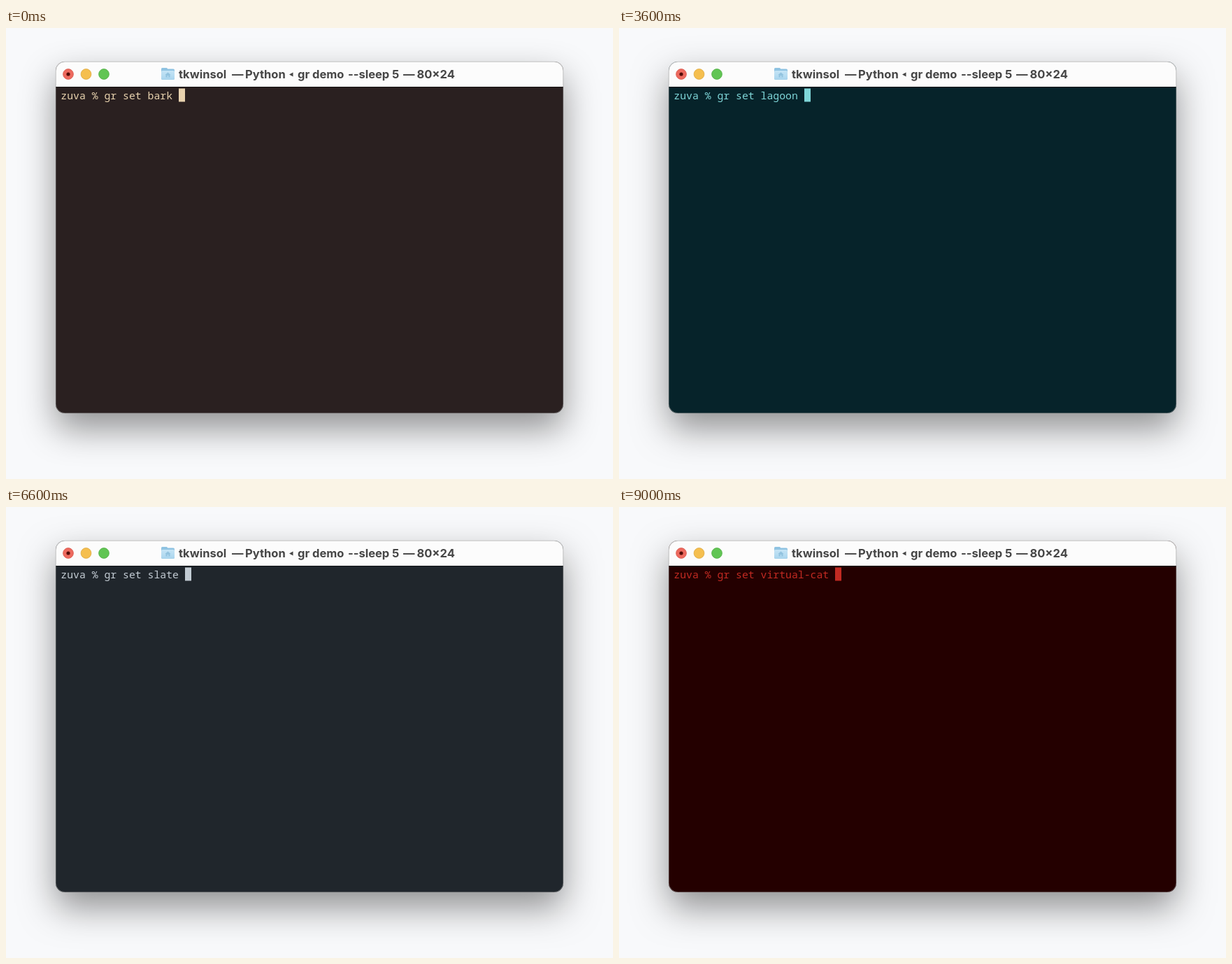
Write an HTML page with a canvas that moves like this. It is 868 by 645 pixels and loops after 9.6 s.

```html
<!DOCTYPE html>
<html lang="en">
<head>
<meta charset="utf-8">
<title>Terminal themes</title>
<style>
  html, body { margin: 0; width: 100%; height: 100%; overflow: hidden; background: #f8f9fb; }
  canvas, svg { position: absolute; left: 0; top: 0; display: block; }
  .title { font: 700 16.5px Inter, "Liberation Sans", sans-serif; fill: #464646; }
  .prompt { font: 500 14.8px "Noto Sans Mono", "DejaVu Sans Mono", monospace; white-space: pre; }
</style>
</head>
<body>
<canvas id="stage" width="868" height="645"></canvas>
<svg width="868" height="645" viewBox="0 0 868 645">
  <g class="title">
    <text x="247" y="71.5">tkwinsol</text>
    <text x="323" y="71.5">—</text>
    <text x="342" y="71.5">Python</text>
    <text x="417" y="71.5">gr demo</text>
    <text x="489" y="71.5">--sleep 5</text>
    <text x="568" y="71.5">—</text>
    <text x="587.5" y="71.5">80×24</text>
  </g>
  <text id="prompt" class="prompt" x="78.3" y="102"></text>
</svg>
<script>
const STEP = 600;
const CELL = 8.88;
const WIN = { x: 71, y: 48, w: 726, h: 503, r: 13, bar: 36 };

// name, background, foreground
const themes = [
  ["bark", "#2a2020", "#e8d2ae"],
  ["blossom", "#2b1420", "#f2b6cc"],
  ["cobalt", "#0b1c3c", "#9cc4f2"],
  ["default", "#000000", "#ffffff"],
  ["fern", "#0a1d12", "#8fd69a"],
  ["grape", "#02030f", "#c832fa"],
  ["lagoon", "#06232a", "#7fd6d8"],
  ["moss", "#0c0d02", "#b4c560"],
  ["nicotine", "#0c0d02", "#ecbe63"],
  ["port", "#183787", "#f59451"],
  ["rust", "#2a1208", "#e88a4e"],
  ["slate", "#20262c", "#c3ccd4"],
  ["swamp-matcha", "#1c3413", "#d3e2ae"],
  ["tide", "#0a2030", "#86c6e6"],
  ["umber", "#24180c", "#dcb482"],
  ["virtual-cat", "#240000", "#c22a22"]
];

const ctx = document.getElementById("stage").getContext("2d");
const prompt = document.getElementById("prompt");

function rounded(x, y, w, h, r) {
  ctx.beginPath();
  ctx.roundRect(x, y, w, h, r);
}

function disc(x, y, r, fill, stroke) {
  ctx.beginPath();
  ctx.arc(x, y, r, 0, Math.PI * 2);
  ctx.fillStyle = fill;
  ctx.fill();
  if (stroke) {
    ctx.strokeStyle = stroke;
    ctx.lineWidth = 0.8;
    ctx.stroke();
  }
}

function polygon(points, fill) {
  ctx.beginPath();
  points.forEach(([x, y]) => ctx.lineTo(x, y));
  ctx.closePath();
  ctx.fillStyle = fill;
  ctx.fill();
}

function drawFolder() {
  ctx.fillStyle = "#8fc3e2";
  rounded(222, 57, 9, 6, 1.5);
  ctx.fill();
  rounded(222, 58.5, 19, 15.5, 1.8);
  ctx.fill();
  const front = ctx.createLinearGradient(0, 61, 0, 74);
  front.addColorStop(0, "#c5e4f5");
  front.addColorStop(1, "#a9d5ee");
  ctx.fillStyle = front;
  rounded(222, 61, 19, 12.8, 1.8);
  ctx.fill();
  polygon([[227.5, 67], [231.5, 63.5], [235.5, 67], [234.5, 67], [234.5, 70.5], [228.5, 70.5], [228.5, 67]], "#92c3df");
  ctx.fillStyle = "#b5dbf0";
  ctx.fillRect(230.6, 68, 1.8, 2.5);
}

function drawWindow(bg) {
  const { x, y, w, h, r, bar } = WIN;
  ctx.save();
  ctx.shadowColor = "rgba(0,0,0,0.42)";
  ctx.shadowBlur = 50;
  ctx.shadowOffsetY = 22;
  ctx.fillStyle = bg;
  rounded(x, y, w, h, r);
  ctx.fill();
  ctx.restore();

  ctx.fillStyle = "#fcfcfc";
  rounded(x, y, w, bar, [r, r, 0, 0]);
  ctx.fill();
  ctx.fillStyle = "rgba(0,0,0,0.5)";
  ctx.fillRect(x, y + bar, w, 1);

  ctx.lineWidth = 1;
  ctx.strokeStyle = "rgba(150,150,150,0.55)";
  rounded(x + 0.25, y + 0.25, w - 0.5, h - 0.5, r);
  ctx.stroke();
}

function drawBar() {
  disc(89, 66, 7.4, "#ed6a5f", "#d9564b");
  disc(89, 66, 2.6, "#530c08");
  disc(114.5, 66, 7.4, "#f5bf4f", "#dca63c");
  disc(140, 66, 7.4, "#61c554", "#50ad43");
  drawFolder();
  polygon([[405, 66.5], [410.5, 63.5], [410.5, 69.5]], "#464646");
}

let shown = -1;

function frame() {
  const i = Math.floor(performance.now() / STEP) % themes.length;
  if (i !== shown) {
    shown = i;
    const [name, bg, fg] = themes[i];
    const line = `zuva % gr set ${name} `;
    ctx.fillStyle = "#f8f9fb";
    ctx.fillRect(0, 0, 868, 645);
    drawWindow(bg);
    drawBar();
    ctx.fillStyle = fg;
    ctx.fillRect(Math.round(78.3 + line.length * CELL), 86.5, 9, 19);
    prompt.textContent = line;
    prompt.style.fill = fg;
  }
  requestAnimationFrame(frame);
}
frame();
</script>
</body>
</html>
```
